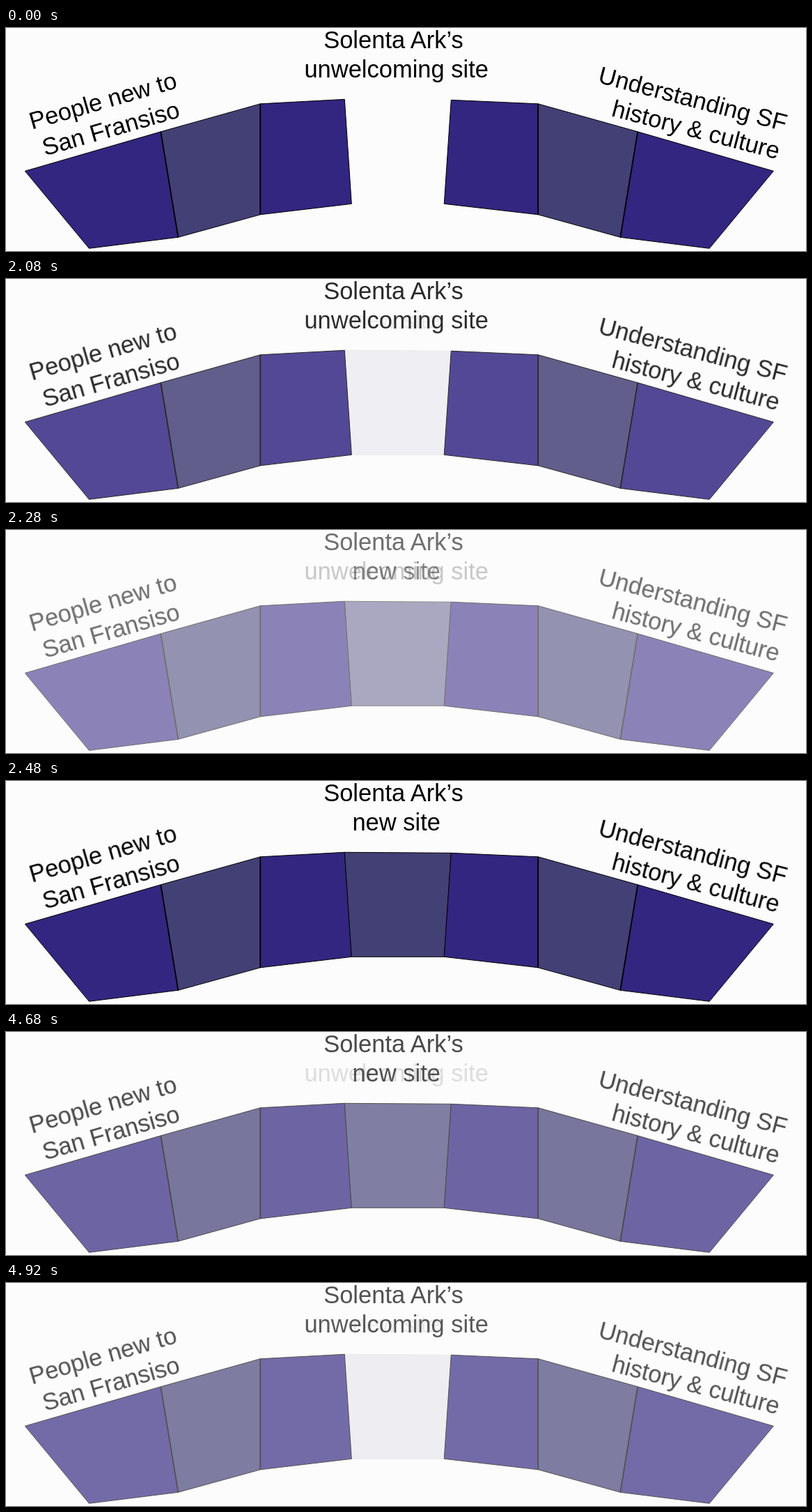
An HTML page for the animation above (4.96 s loop, 1149 by 320 pixels).

```html
<!DOCTYPE html>
<html lang="en">
<head>
<meta charset="utf-8">
<title>Bridge</title>
<style>
  html, body { margin: 0; width: 100%; height: 100%; overflow: hidden; background: #fcfcfc; }
  svg { display: block; width: 1149px; height: 320px; }
  text { font: 34.5px "Liberation Sans", Arial, sans-serif; }
  polygon { stroke: #000; stroke-linejoin: round; }
  .joint { stroke: #000; stroke-width: 1.7; }
</style>
</head>
<body>
<svg viewBox="0 0 1149 320">
  <g id="broken"></g>
  <g id="whole"></g>
</svg>
<script>
const LOOP = 4960, STEP = 40, LAST = 11;
const TO_WHOLE = 2040, TO_BROKEN = 4600;
const LINE = 41.5, WIDTH = 1129, GAP = 3;
const BLUE = "#322680", GREY = "#434076";

// Each rib joins a point on the top edge to one on the bottom edge.
const rib = (x1, y1, x2, y2) => ({ x1, y1, x2, y2 });
const mirror = r => rib(WIDTH - r.x1, r.y1, WIDTH - r.x2, r.y2);
const outer = [
  rib(27, 205, 119, 316),
  rib(222, 148.5, 247, 300),
  rib(365, 108.5, 365, 267.5)
];
const ribs = [
  ...outer,
  rib(486, 102, 496, 252),
  rib(639, 103, 629, 252),
  ...outer.map(mirror).reverse()
];

function panel(i) {
  const a = ribs[i], b = ribs[i + 1];
  return `<polygon fill="${i % 2 ? GREY : BLUE}"
    points="${a.x1},${a.y1} ${b.x1},${b.y1} ${b.x2},${b.y2} ${a.x2},${a.y2}"/>`;
}

const joint = ({ x1, y1, x2, y2 }) =>
  `<line class="joint" x1="${x1}" y1="${y1}" x2="${x2}" y2="${y2}"/>`;

function bridge(hasMiddle) {
  let shapes = "";
  for (let i = 0; i < ribs.length - 1; i++) {
    if (i !== GAP || hasMiddle) shapes += panel(i);
  }
  for (const r of outer.slice(1)) shapes += joint(r) + joint(mirror(r));
  return `<g transform="translate(0.3 0.3)">${shapes}</g>`;
}

const label = (x, y, angle, anchor, ...lines) =>
  `<g transform="translate(${x} ${y}) rotate(${angle})" text-anchor="${anchor}">` +
  lines.map((line, i) => `<text y="${i * LINE}">${line}</text>`).join("") + "</g>";

const slide = (hasMiddle, site) =>
  bridge(hasMiddle) +
  label(556.5, 29, 0, "middle", "Solenta Ark’s") +
  label(560.7, 29 + LINE, 0, "middle", site) +
  label(142.3, 115.7, -16, "middle", "People new to", "San Fransiso") +
  label(1118.2, 148.2, 14.6, "end", "Understanding SF", "history &amp; culture");

const broken = document.getElementById("broken");
const whole = document.getElementById("whole");
broken.innerHTML = slide(false, "unwelcoming site");
whole.innerHTML = slide(true, "new site");

// The outgoing slide fades faster than the incoming one arrives.
function crossfade(outgoing, incoming, elapsed) {
  const k = Math.min(LAST, Math.floor(elapsed / STEP));
  outgoing.setAttribute("opacity", (1 - k / LAST) ** 2);
  incoming.setAttribute("opacity", ((k + 1) / (LAST + 1)) ** 1.5);
}

function draw(t) {
  if (t < TO_WHOLE) crossfade(whole, broken, LOOP);
  else if (t < TO_BROKEN) crossfade(broken, whole, t - TO_WHOLE);
  else crossfade(whole, broken, t - TO_BROKEN);
}

const start = performance.now();
function tick() {
  draw((performance.now() - start) % LOOP);
  requestAnimationFrame(tick);
}
tick();
</script>
</body>
</html>
```
